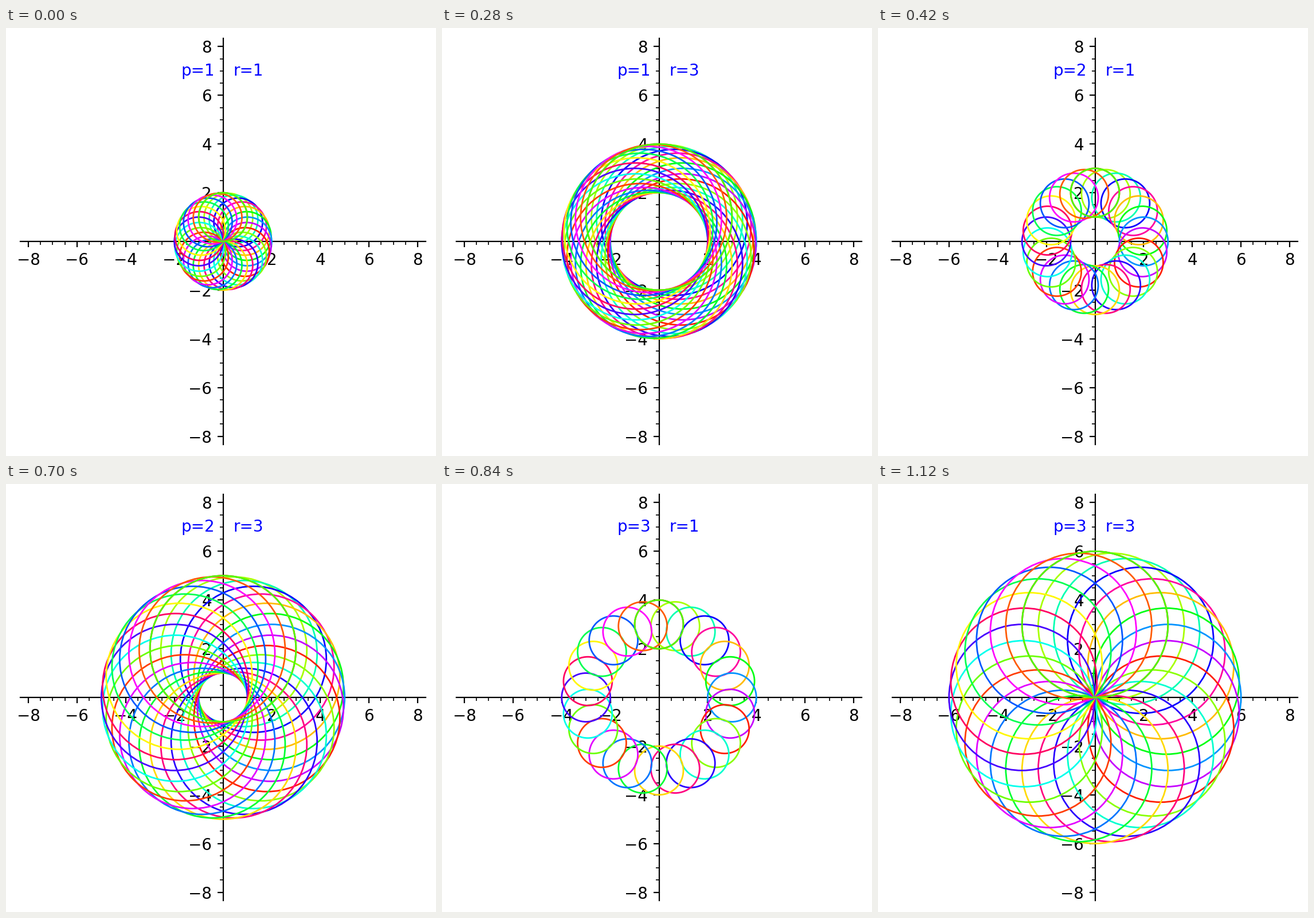
A matplotlib script that plays this animation: 750 px wide and 746 px high, repeating every 1260 ms.

```python
import colorsys
import math

import matplotlib.pyplot as plt
from matplotlib.animation import FuncAnimation
from matplotlib.patches import Circle
from matplotlib.ticker import MultipleLocator

WIDTH, HEIGHT, DPI = 750, 746, 200
CENTER_X, CENTER_Y = 378.5, 372
UNIT = 42.44          # pixels per axis unit
LIMIT = 8.33
STEPS = 28            # circles per turn; the last one closes the ring

plt.rcParams["font.family"] = "DejaVu Sans"
plt.rcParams["font.size"] = 10

fig = plt.figure(figsize=(WIDTH / DPI, HEIGHT / DPI), dpi=DPI, facecolor="white")
half = LIMIT * UNIT
ax = fig.add_axes([(CENTER_X - half) / WIDTH, 1 - (CENTER_Y + half) / HEIGHT,
                   2 * half / WIDTH, 2 * half / HEIGHT])
ax.set(xlim=(-LIMIT, LIMIT), ylim=(-LIMIT, LIMIT))

for side in ("left", "bottom"):
    ax.spines[side].set_position("zero")
for side in ("right", "top"):
    ax.spines[side].set_visible(False)
for axis in (ax.xaxis, ax.yaxis):
    axis.set_ticks([v for v in range(-8, 9, 2) if v])
    axis.set_minor_locator(MultipleLocator(0.5))

angles = [2 * math.pi * n / STEPS for n in range(STEPS + 1)]
circles = [
    ax.add_patch(Circle((0, 0), 1, fill=False, linewidth=1, zorder=5,
                        edgecolor=colorsys.hsv_to_rgb(t % 1, 1, 1)))
    for t in angles
]


def label(x):
    return ax.text(x, 7, "", color="blue", ha="left", va="center")


p_label, r_label = label(-1.71), label(0.435)


def update(frame):
    p, r = frame // 3 + 1, frame % 3 + 1
    for circle, t in zip(circles, angles):
        circle.set_center((p * math.sin(t), p * math.cos(t)))
        circle.set_radius(r)
    p_label.set_text(f"p={p}")
    r_label.set_text(f"r={r}")
    return [*circles, p_label, r_label]


anim = FuncAnimation(fig, update, frames=9, interval=140, repeat=True,
                     repeat_delay=0, blit=False)
plt.show()
```
